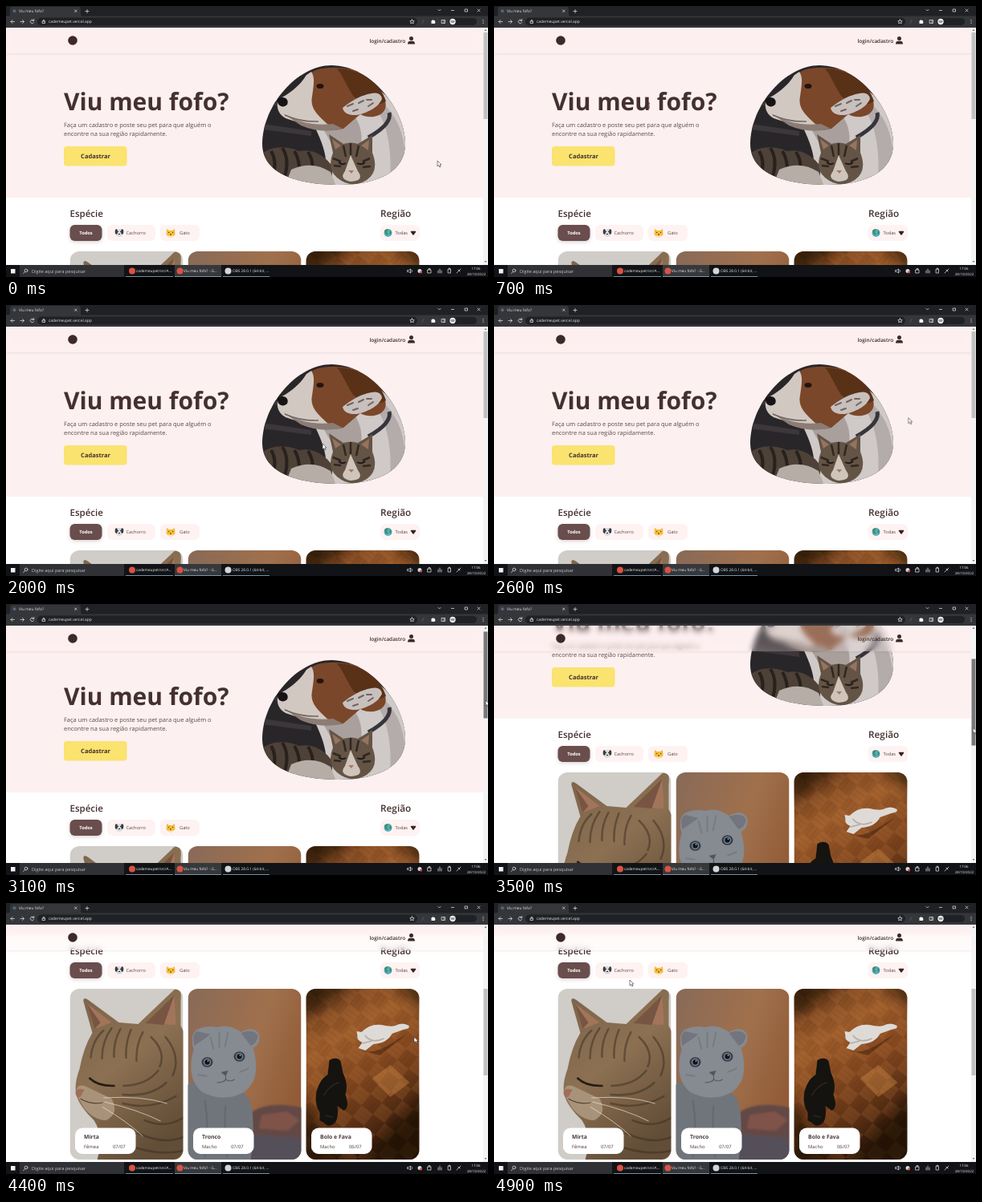
An HTML page that plays this animation: 600 by 338 pixels, repeating every 5000 ms.

```html
<!DOCTYPE html>
<html lang="pt-BR">
<head>
<meta charset="utf-8">
<title>Viu meu fofo?</title>
<style>
html, body { margin: 0; width: 100%; height: 100%; overflow: hidden; background: #fff; }
svg { position: absolute; left: 0; top: 0; display: block; }
text { font-family: "Open Sans", "Noto Sans", sans-serif; text-rendering: geometricPrecision; }
#stage { position: relative; width: 600px; height: 338px; overflow: hidden; }
#view { position: absolute; top: 27px; width: 600px; height: 296px; overflow: hidden; background: #fff; }
#page { top: -27px; }
#bar {
  position: absolute; width: 594px; height: 32px;
  background: rgba(255, 238, 238, .24);
  backdrop-filter: blur(3.5px);
  box-shadow: 0 1px 3px rgba(120, 60, 60, .1);
}
.b { font-weight: 700; }
.s { font-weight: 600; }
.line { fill: none; stroke: #d5d7da; stroke-width: .8; stroke-linecap: round; stroke-linejoin: round; }

#page, #thumb, #mouse, #arrow, #beam { animation: 5s -10ms infinite; }
#page { animation-name: scroll; }
#thumb { animation-name: thumb; }
#mouse { animation-name: mouse; }
#arrow { animation-name: arrow; }
#beam { animation-name: beam; }

@keyframes scroll {
  0%, 60% { transform: translateY(0); animation-timing-function: steps(1); }
  62% { transform: translateY(-4px); animation-timing-function: steps(7); }
  76% { transform: translateY(-165px); animation-timing-function: steps(3); }
  82%, 100% { transform: translateY(-199px); }
}
@keyframes thumb {
  0% { transform: translateY(0); fill: #c1c1c1; animation-timing-function: steps(1); }
  60% { transform: translateY(0); fill: #787878; animation-timing-function: steps(1); }
  62% { transform: translateY(1.5px); fill: #787878; animation-timing-function: steps(7); }
  76% { transform: translateY(61px); fill: #787878; animation-timing-function: steps(3); }
  82% { transform: translateY(74px); fill: #787878; animation-timing-function: steps(1); }
  84%, 100% { transform: translateY(74px); fill: #c1c1c1; }
}
@keyframes mouse {
  0% { transform: translate(537px, 193px); animation-timing-function: steps(7); }
  14% { transform: translate(193px, 124px); animation-timing-function: steps(13); }
  40% { transform: translate(394px, 173px); animation-timing-function: steps(10); }
  60% { transform: translate(597px, 119px); animation-timing-function: steps(1); }
  62% { transform: translate(597px, 120px); animation-timing-function: steps(7); }
  76% { transform: translate(596px, 180px); animation-timing-function: steps(3); }
  82% { transform: translate(596px, 193px); animation-timing-function: steps(3); }
  88% { transform: translate(508px, 167px); animation-timing-function: steps(5); }
  98%, 100% { transform: translate(169px, 96px); }
}
@keyframes arrow {
  0% { opacity: 1; animation-timing-function: steps(1); }
  12% { opacity: 0; animation-timing-function: steps(1); }
  20%, 100% { opacity: 1; }
}
@keyframes beam {
  0% { opacity: 0; animation-timing-function: steps(1); }
  12% { opacity: 1; animation-timing-function: steps(1); }
  20%, 100% { opacity: 0; }
}
</style>
</head>
<body>
<div id="stage">
  <div id="view">
    <svg id="page" width="600" height="570" viewBox="0 0 600 570">
      <defs>
        <clipPath id="blob"><path d="M319 172C319 125 362 74 405 74C455 74 497 130 497 172C497 205 465 223 415 223C360 223 319 208 319 172Z"/></clipPath>
        <clipPath id="card"><rect width="141" height="213" rx="12"/></clipPath>
        <filter id="soft" x="-20%" y="-40%" width="140%" height="200%"><feDropShadow dx="0" dy="1.500" stdDeviation="2" flood-color="#6b4a4a" flood-opacity=".25"/></filter>
        <filter id="fuzz"><feGaussianBlur stdDeviation="1"/></filter>
        <filter id="haze"><feGaussianBlur stdDeviation=".6"/></filter>
        <filter id="shade" x="-50%" y="-50%" width="200%" height="200%"><feGaussianBlur stdDeviation="8"/></filter>
        <linearGradient id="wall" x2="1" y2=".5"><stop stop-color="#886a58"/><stop offset=".6" stop-color="#a0704c"/><stop offset="1" stop-color="#925c38"/></linearGradient>
        <linearGradient id="fur" y2="1" x2=".5"><stop stop-color="#7a644b"/><stop offset=".5" stop-color="#8c7052"/><stop offset="1" stop-color="#624d37"/></linearGradient>
        <linearGradient id="floor" x2=".4" y2="1"><stop stop-color="#653719"/><stop offset=".35" stop-color="#9b5b2a"/><stop offset=".6" stop-color="#81461e"/><stop offset="1" stop-color="#3f200d"/></linearGradient>
        <pattern id="wood" width="36" height="36" patternUnits="userSpaceOnUse" patternTransform="rotate(38)">
          <path d="M0 0H18V18H0ZM18 18H36V36H18Z" fill="#c98141" opacity=".18"/>
          <path d="M0 6H18M0 12H18M24 0V18M30 0V18M18 24H36M18 30H36M6 18V36M12 18V36" stroke="#3a1c0a" stroke-width=".5" opacity=".3"/>
        </pattern>
      </defs>

      <rect width="600" height="570" fill="#fff"/>
      <rect width="594" height="239" fill="#fdf0f0"/>
      <g fill="#44302f">
        <text class="b" x="72" y="130" font-size="30">Viu meu fofo?</text>
        <g font-size="7.48" fill="#5c4b4a">
          <text x="72" y="151">Faça um cadastro e poste seu pet para que alguém o</text>
          <text x="72" y="162">encontre na sua região rapidamente.</text>
        </g>
      </g>
      <rect x="72" y="175" width="78.500" height="24.500" rx="3.500" fill="#fae36f"/>
      <text class="b" x="111.500" y="190" font-size="7.500" fill="#44302f" text-anchor="middle">Cadastrar</text>

      <g clip-path="url(#blob)">
        <rect x="319" y="74" width="178" height="150" fill="#292629"/>
        <g filter="url(#haze)">
          <path d="M319 147L380 156V162L319 154ZM326 115L350 125V129L322 120ZM440 74L497 92V98L436 80Z" fill="#3c373a"/>
          <path d="M422 92C456 84 500 128 500 172V226H390C405 202 398 180 385 152Z" fill="#cfc9c7"/>
          <path d="M394 152Q419 151 435 139Q446 157 441 178L411 182Z" fill="#a9a09d"/>
          <path d="M468 120C488 140 497 160 497 195L478 216C481 180 474 146 462 131Z" fill="#b3acab"/>
          <path d="M373 88C383 77 405 74 430 79C452 84 466 100 472 119C477 136 455 143 441 135L420 153C393 160 372 144 362 125Z" fill="#7b472a"/>
          <path d="M412 78C441 78 466 95 473 119C461 127 442 122 432 112C424 100 420 88 412 78Z" fill="#593117"/>
          <path d="M374 86C366 100 350 111 340 116C335 125 339 137 351 141C365 146 387 151 401 148C389 137 378 128 381 113C383 99 385 89 380 82Z" fill="#d2c8c2"/>
          <path d="M344 133Q371 151 407 147L419 153Q393 160 367 149Z" fill="#8b7c75"/>
          <path d="M338 116C346 111 353 116 350 123C345 128 337 125 338 116Z" fill="#171416"/>
          <path d="M347 136Q367 145 389 144" fill="none" stroke="#706560" stroke-width="1.500"/>
          <ellipse cx="391" cy="100" rx="4.500" ry="3" fill="#21150f"/>
          <path d="M419 127Q435 114 450 110Q467 105 468 116Q462 130 437 136Q421 137 419 127Z" fill="#c8c0bd"/>
          <path d="M425 125l7 -3M439 121l6 -3M432 131l6 -2M449 117l6 0M451 125l6 -4" stroke="#716464" stroke-width="2" stroke-linecap="round"/>
          <path d="M477 133Q481 147 451 164" fill="none" stroke="#37343b" stroke-width="5"/>
          <path d="M317 186C329 174 349 174 365 181C384 177 398 188 407 201L404 226H317Z" fill="#4d4138"/>
          <path d="M330 181q8 13 2 31M344 177q10 15 2 39M359 181q9 15 5 38M376 182q10 16 3 37" fill="none" stroke="#28211d" stroke-width="4"/>
          <path d="M355 204Q381 192 404 207L411 225H347Z" fill="#b6ada6"/>
          <path d="M407 183L402 160L420 172Q430 169 438 172L456 161L456 183Q465 206 449 217Q430 229 412 214Q399 203 407 183Z" fill="#645446"/>
          <path d="M406 166L410 179L417 174ZM452 167L442 174L451 180Z" fill="#96745f"/>
          <path d="M420 174l3 14M429 171v15M439 174l-3 14M407 190l10 4M453 190l-9 4M408 199l9 1M454 200l-10 1" stroke="#302720" stroke-width="2.500"/>
          <path d="M429 186L422 206Q414 216 429 219Q447 218 438 206Z" fill="#cfc5bb"/>
          <path d="M414 195q5 4 9 1M437 196q5 3 10 -1" fill="none" stroke="#1e1918" stroke-width="1.800"/>
          <path d="M426 205h7l-3 4Z" fill="#ad7770"/>
        </g>
      </g>

      <g class="s" fill="#44302f">
        <text x="79.500" y="263" font-size="11.500">Espécie</text>
        <text x="466" y="263" font-size="11.800">Região</text>
      </g>
      <rect x="79.500" y="273" width="40" height="20" rx="6" fill="#6b4d4d" filter="url(#soft)"/>
      <g fill="#fef3f2">
        <rect x="126" y="273" width="60" height="20" rx="6"/>
        <rect x="192" y="273" width="49" height="20" rx="6"/>
        <rect x="466" y="273" width="49" height="20" rx="6"/>
      </g>
      <g font-size="5.700" fill="#5c4544">
        <text class="b" x="99.500" y="285" text-anchor="middle" fill="#fff">Todos</text>
        <text x="149.500" y="285">Cachorro</text>
        <text x="216" y="285">Gato</text>
        <text x="484.500" y="285">Todas</text>
      </g>
      <path d="M504.500 281.500H509.500L507 285Z" fill="#352423" stroke="#352423" stroke-width="1.500" stroke-linejoin="round"/>
      <g>
        <ellipse cx="141" cy="283" rx="4.500" ry="5" fill="#d8dadd"/>
        <ellipse cx="137.300" cy="281.500" rx="1.600" ry="3.300" fill="#373b40"/>
        <ellipse cx="144.700" cy="281.500" rx="1.600" ry="3.300" fill="#373b40"/>
        <path d="M139 281.500h1M142 281.500h1M140 284.500h2" stroke="#222" stroke-width="1.200"/>
        <path d="M200 278L203 280H207L210 278L210.500 285Q205 292 199.500 285Z" fill="#f4bb35"/>
        <path d="M202 282.500h1.200M207 282.500h1.200M204 285h2" stroke="#563719" stroke-width="1.200"/>
        <path d="M202 286.500q3 2 6 0" fill="none" stroke="#fff2d4" stroke-width="1.200"/>
        <circle cx="475.500" cy="283" r="5" fill="#55b1c5"/>
        <path d="M471 280q3 -3 5 -1l-2 3 2 3q-2 2 -4 -1ZM478 279l2 3 -1 4 -2 -3Z" fill="#438f6b"/>
      </g>

      <g transform="translate(79.500 306)" clip-path="url(#card)">
        <rect width="141" height="213" fill="#d0ccc7"/>
        <g filter="url(#haze)">
          <path d="M28 55L17 16Q16 9 23 14L61 42L85 44L130 1Q140 -3 138 15V46L145 60V220H32Q44 185 30 164Q13 148 8 133Q5 119 12 100Q17 73 28 55Z" fill="url(#fur)"/>
          <path d="M31 50L21 18L52 42ZM94 43L130 8L132 45Z" fill="#a2755b"/>
          <path d="M94 43L130 8L117 45ZM31 50L21 18L38 42Z" fill="#785542"/>
          <path d="M8 131Q7 118 18 121Q33 128 52 137Q62 156 45 164Q30 164 17 148Z" fill="#a8937a"/>
          <path d="M7 130Q8 123 18 126L13 135Q8 136 7 130Z" fill="#a06e59"/>
          <path d="M13 137Q26 145 41 142" fill="none" stroke="#584333" stroke-width="1.200"/>
          <path d="M24 111Q35 122 56 121" fill="none" stroke="#271d17" stroke-width="2.500"/>
          <path d="M42 52q-14 12 -16 34M52 49q-12 16 -12 38M63 50q-9 16 -8 35M76 51q-7 17 -6 35M91 54q-9 16 -8 36M67 121q29 -1 43 -19M66 132q35 3 54 -15M66 143q35 9 66 -9M101 60q19 18 11 37M119 60q20 24 9 48M93 164q25 11 48 -3M85 180q31 15 56 5M76 196q35 13 65 6" fill="none" stroke="#3a2c20" stroke-width="2.500" stroke-linecap="round" opacity=".5"/>
          <path d="M42 136Q89 133 121 143M43 141Q85 151 113 165M40 147Q72 166 91 184" fill="none" stroke="#eee3cf" stroke-width=".7"/>
        </g>
      </g>

      <g transform="translate(226.500 306)" clip-path="url(#card)">
        <rect width="141" height="213" fill="url(#wall)"/>
        <g filter="url(#fuzz)">
          <path d="M80 153Q103 139 145 149V220H75Z" fill="#644a45"/>
          <path d="M92 157L123 153L139 164L124 177L88 174Z" fill="#8c564b" opacity=".7"/>
          <path d="M73 181L145 187V220H75Z" fill="#54505a"/>
        </g>
        <g filter="url(#haze)">
          <path d="M-4 121Q45 101 76 137Q86 165 77 220H-4Z" fill="#70757c"/>
          <path d="M7 76Q2 57 11 51Q24 45 36 48Q51 43 66 54Q83 45 89 58Q90 70 81 74Q92 111 71 128Q47 143 18 129Q-3 112 7 76Z" fill="#868a91"/>
          <path d="M8 71Q4 56 12 53L28 57ZM66 55Q83 49 87 59Q86 68 78 71Z" fill="#72757d"/>
          <path d="M28 60l4 16M39 54v20M50 54l-4 19M12 107l12 2M76 99l-12 5" stroke="#777b83" stroke-width="2"/>
          <path d="M21 139q6 36 0 71M47 145q-3 28 2 65" fill="none" stroke="#646871" stroke-width="2"/>
          <path d="M41 104L50 102L47 109Z" fill="#57525a"/>
          <path d="M47 109v4M36 117q9 0 11 -4q5 4 11 0" fill="none" stroke="#555860" stroke-width="1.200"/>
          <ellipse cx="24" cy="91.500" rx="7" ry="6.300" fill="#3b3e45"/>
          <ellipse cx="64" cy="84.500" rx="7" ry="6.300" fill="#3b3e45"/>
        </g>
        <g fill="#7890a4"><circle cx="24" cy="91.500" r="4.500"/><circle cx="64" cy="84.500" r="4.500"/></g>
        <g fill="#10151c"><circle cx="24" cy="91.500" r="3.200"/><circle cx="64" cy="84.500" r="3.200"/></g>
        <g fill="#eef"><circle cx="25" cy="90" r=".8"/><circle cx="65" cy="83" r=".8"/></g>
      </g>

      <g transform="translate(373.500 306)" clip-path="url(#card)">
        <rect width="141" height="213" fill="url(#floor)"/>
        <rect width="141" height="213" fill="url(#wood)"/>
        <path d="M-9 -9H64L-9 40ZM105 -9H150V28ZM58 222L150 128V222ZM-9 130L23 176L52 222H-9Z" fill="#190b04" opacity=".65" filter="url(#shade)"/>
        <g filter="url(#haze)">
          <path d="M82 112L105 95L129 117L105 135Z" fill="#d18c47" opacity=".4"/>
          <path d="M69 77Q85 83 111 65L125 57L92 83Z" fill="#42200d" opacity=".55"/>
          <path d="M64 59L63 53L69 54Q80 43 94 45Q105 48 111 46Q120 41 128 46Q130 50 121 51L107 56Q101 68 84 69L74 77L65 74L70 67Q63 64 64 59Z" fill="#dedad6"/>
          <path d="M73 58q9 11 24 4M70 68l12 -3" fill="none" stroke="#b4aaa5" stroke-width="1.500"/>
          <path d="M29 89Q38 84 43 90L46 105Q53 119 49 132Q55 148 47 152L39 146Q41 163 35 168Q28 174 22 167L17 164L17 154Q10 143 13 128Q17 113 27 107Z" fill="#15130f"/>
          <path d="M22 133q8 -14 19 -16M24 158l9 2" fill="none" stroke="#2b2622" stroke-width="1.500"/>
        </g>
      </g>
      <g id="labels"></g>
    </svg>
    <div id="bar"></div>
  </div>

  <svg width="600" height="338" viewBox="0 0 600 338">
    <circle cx="83" cy="43" r="5.800" fill="#3d2928"/>
    <text class="s" x="452.500" y="45.600" font-size="6.450" fill="#3d2928">login/cadastro</text>
    <circle cx="504.500" cy="40.500" r="2.500" fill="#3d2928"/>
    <path d="M500 47.500Q500 43.700 503 43.700H506Q509 43.700 509 47.500Z" fill="#3d2928"/>

    <rect x="594" y="27" width="6" height="296" fill="#f4f3f3"/>
    <path d="M595.500 31L597 29L598.500 31ZM595.500 318L597 320L598.500 318Z" fill="#777"/>
    <rect id="thumb" x="594.500" y="33" width="5" height="108" fill="#c1c1c1"/>

    <rect width="600" height="13" fill="#202124"/>
    <path d="M2 13Q5 13 5 10V4Q5 1 8 1H90Q93 1 93 4V10Q93 13 96 13Z" fill="#35363a"/>
    <rect y="12.500" width="600" height="14.500" fill="#35363a"/>
    <rect x="39" y="14.500" width="473" height="10" rx="5" fill="#202124"/>
    <circle cx="10.500" cy="6.300" r="2" fill="#536681"/>
    <g fill="#e4e5e7">
      <text x="16" y="8.300" font-size="4.850">Viu meu fofo?</text>
      <text x="53" y="21.300" font-size="4.950">cademeupet.vercel.app</text>
      <text x="562.500" y="21.300" font-size="4.700">Anônimo</text>
    </g>
    <g class="line">
      <path d="M85.500 5l2.500 2.500m0 -2.500l-2.500 2.500M99 6.500h4m-2 -2v4"/>
      <path d="M538 4.500l1.500 1.500 1.500 -1.500M554.500 5.500h3M571.500 4h3v3h-3ZM587 4l3 3m0 -3l-3 3"/>
      <path d="M10.500 19.500H6m2 -2l-2 2 2 2M18 19.500h4.500m-2 -2l2 2 -2 2M34.500 18a2.300 2.300 0 1 0 .2 2.500M34.800 16.500v2h-2"/>
      <path d="M45.500 19h3v2.500h-3ZM46 19v-1q1 -1.500 2 0v1"/>
      <path d="M505.500 16.800l.8 1.700 1.900.2 -1.400 1.300.4 1.900 -1.700 -1 -1.700 1 .4 -1.900 -1.400 -1.300 1.900 -.2Z"/>
      <path d="M518 21.500l2 -4" opacity=".25"/>
      <path d="M542.500 17.500h4v4h-4ZM545 17.500v4"/>
    </g>
    <path d="M529.500 18h1.500q0 -2 1.500 0H534v1.500q1.500 .5 0 1.500v1H529.500Z" fill="#f4f4f4"/>
    <rect x="551" y="15" width="35" height="9" rx="4.500" fill="#202124"/>
    <circle cx="556" cy="19.500" r="3.700" fill="#f1f2f3"/>
    <path d="M553.500 19h5M554.500 20.500h1m1 0h1" stroke="#45484d"/>
    <path d="M594 17v1m0 1v1m0 1v1" stroke="#ddd"/>

    <rect y="323" width="600" height="15" fill="#111316"/>
    <rect x="6" y="328" width="5.500" height="5.500" fill="#eef0f2"/>
    <rect x="17" y="323" width="130" height="15" fill="#303135"/>
    <circle class="line" cx="25" cy="330" r="1.900"/><path class="line" d="M23.600 331.500l-2 2"/>
    <rect x="210" y="323" width="58" height="15" fill="#36383c"/>
    <path d="M149 337.500H208M210 337.500H268M270 337.500H328" stroke="#7b9db5" stroke-width=".9"/>
    <circle cx="157" cy="330.500" r="4" fill="#d95342"/>
    <circle cx="216.500" cy="330.500" r="4" fill="#d95342"/>
    <circle cx="276.500" cy="330.500" r="4" fill="#d5d6da"/>
    <g fill="#e7e8ea" font-size="4.750">
      <text x="32" y="332.600" font-size="5.500" fill="#c4c6c9">Digite aqui para pesquisar</text>
      <text x="162" y="332.400">cademeupet/src/A...</text>
      <text x="221" y="332.400">Viu meu fofo? - G...</text>
      <text x="282" y="332.400">OBS 28.0.1 (64-bit, ...</text>
      <g font-size="4.400" text-anchor="middle"><text x="585" y="328.800">17:06</text><text x="585.500" y="336">28/10/2022</text></g>
    </g>
    <g class="line">
      <path d="M500 329.500h1.500l2 -1.500v5l-2 -1.500H500ZM505 329q1.500 1.500 0 3"/>
      <path d="M525 329h4v4h-4ZM526 329v-1.500h2v1.500M538 333v-3m2 3v-5m2 5v-3M550.500 328h3v5h-3ZM551.500 328v-1h1v1M561 333l5 -5M563 329l2 2"/>
    </g>
    <circle cx="515" cy="330.500" r="2.500" fill="#d7d9dc"/><circle cx="516.500" cy="332" r="1.500" fill="#e04a3f"/>

    <g id="mouse">
      <path id="arrow" d="M0 0V7L1.600 5.500L2.800 8L4 7.500L2.900 5H5Z" fill="#fff" stroke="#222" stroke-width=".55"/>
      <path id="beam" d="M-1 -3h2M0 -3v6M-1 3h2" stroke="#222" stroke-width=".7"/>
    </g>
  </svg>
</div>
<script>
const pets = [["Mirta", "Fêmea", "07/07"], ["Tronco", "Macho", "07/07"], ["Bolo e Fava", "Macho", "06/07"]];
document.getElementById("labels").innerHTML = pets.map(([name, sex, date], i) => `
  <g transform="translate(${86 + i * 147} 479.500)">
    <rect width="75.500" height="32.500" rx="9" fill="#fff"/>
    <g fill="#4b3938" font-size="5.900">
      <text class="b" x="11" y="13.500" font-size="6.900">${name}</text>
      <text x="11" y="25">${sex}</text>
      <text x="47" y="25">${date}</text>
    </g>
  </g>`).join("");
</script>
</body>
</html>
```
